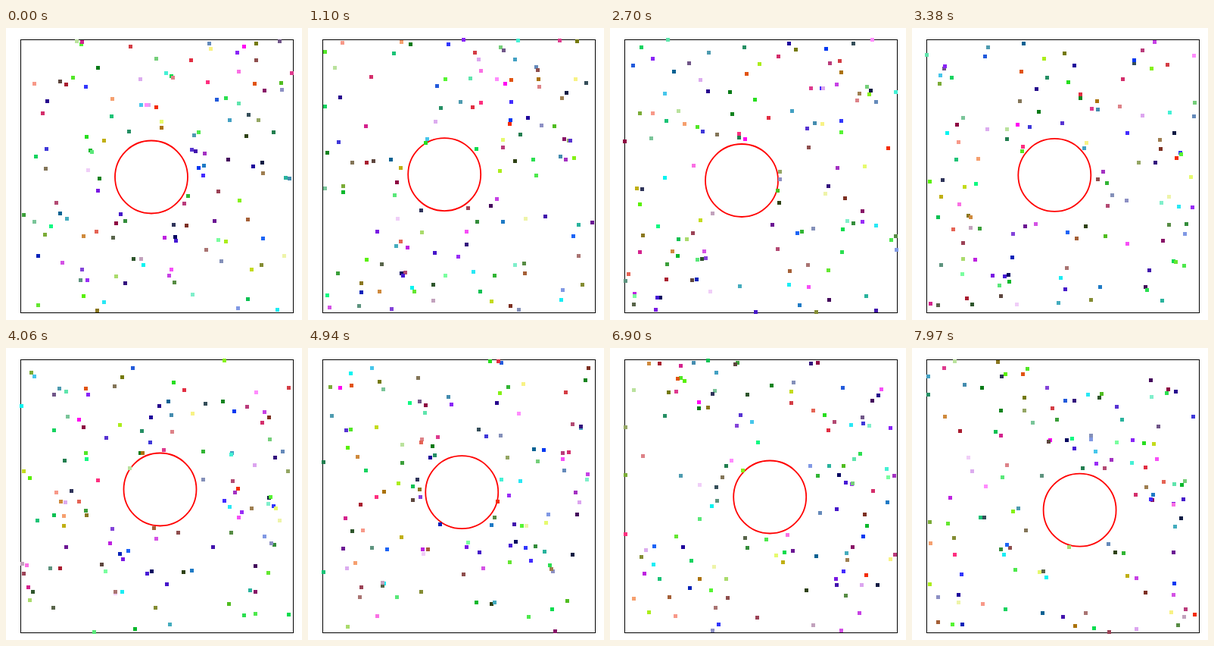
An HTML page with a canvas that plays this animation: 391x385 px, repeating every 7.99 s.

```html
<!DOCTYPE html>
<html lang="en">
<head>
<meta charset="utf-8">
<title>Brownian motion</title>
<style>
  html, body { margin: 0; width: 100%; height: 100%; overflow: hidden; background: #fff; }
  canvas { display: block; }
</style>
</head>
<body>
<canvas id="stage" width="391" height="385"></canvas>
<script>
const ctx = document.getElementById('stage').getContext('2d');

const LOOP = 7990, TICK = 30, STEP = 10;      // ms
const BOX = { left: 19, top: 15, size: 360 };
const RADIUS = 48, COUNT = 126;

// Heavy disc: time in ms, centre x, centre y
const DISC_PATH = [
  [0, 192, 196.5], [1100, 180, 193], [2700, 174, 201], [4060, 203.5, 186.5],
  [5840, 203, 194], [6900, 211.2, 196.5], [7990, 222, 214.3]
];

// Spans in which the picture stands still
const HOLDS = [[3220, 3320], [4060, 4160], [4940, 4990], [5740, 5840]];

function makeRandom(seed) {
  return () => {
    seed = (seed + 0x6D2B79F5) | 0;
    let n = Math.imul(seed ^ (seed >>> 15), 1 | seed);
    n = (n + Math.imul(n ^ (n >>> 7), 61 | n)) ^ n;
    return ((n ^ (n >>> 14)) >>> 0) / 4294967296;
  };
}

function discAt(time) {
  let i = 1;
  while (i < DISC_PATH.length - 1 && time > DISC_PATH[i][0]) i++;
  const [t0, x0, y0] = DISC_PATH[i - 1];
  const [t1, x1, y1] = DISC_PATH[i];
  const vx = (x1 - x0) / (t1 - t0), vy = (y1 - y0) / (t1 - t0);
  return { x: x0 + vx * (time - t0), y: y0 + vy * (time - t0), vx, vy };
}

function createParticles() {
  const random = makeRandom(27);
  const disc = discAt(0);
  const channel = () => Math.floor(random() * 256);
  return Array.from({ length: COUNT }, () => {
    let x, y;
    do {
      x = BOX.left + random() * BOX.size;
      y = BOX.top + random() * BOX.size;
    } while (Math.hypot(x - disc.x, y - disc.y) < RADIUS);
    const angle = random() * 2 * Math.PI;
    const speed = 0.04 + random() * 0.07;     // px per ms
    return {
      x, y,
      vx: speed * Math.cos(angle),
      vy: speed * Math.sin(angle),
      color: `rgb(${channel()}, ${channel()}, ${channel()})`
    };
  });
}

function bounceOffWall(p, axis, velocity, min) {
  const max = min + BOX.size;
  if (p[axis] < min) {
    p[axis] = 2 * min - p[axis];
    p[velocity] = Math.abs(p[velocity]);
  } else if (p[axis] > max) {
    p[axis] = 2 * max - p[axis];
    p[velocity] = -Math.abs(p[velocity]);
  }
}

function bounceOffDisc(p, disc) {
  const dx = p.x - disc.x, dy = p.y - disc.y;
  const distance = Math.hypot(dx, dy);
  if (distance >= RADIUS) return;
  const nx = dx / distance, ny = dy / distance;
  const approach = (p.vx - disc.vx) * nx + (p.vy - disc.vy) * ny;
  if (approach < 0) {
    p.vx -= 2 * approach * nx;
    p.vy -= 2 * approach * ny;
  }
  p.x = disc.x + nx * RADIUS;
  p.y = disc.y + ny * RADIUS;
}

let particles = createParticles();
let simulated = 0;

// Fixed steps from the loop start keep the state a function of time alone
function simulateTo(time) {
  if (time < simulated) {
    particles = createParticles();
    simulated = 0;
  }
  while (simulated < time) {
    simulated += STEP;
    const disc = discAt(simulated);
    for (const p of particles) {
      p.x += p.vx * STEP;
      p.y += p.vy * STEP;
      bounceOffWall(p, 'x', 'vx', BOX.left);
      bounceOffWall(p, 'y', 'vy', BOX.top);
      bounceOffDisc(p, disc);
    }
  }
}

function shownTime(time) {
  const hold = HOLDS.find(([start, end]) => time >= start && time < end);
  return hold ? hold[0] : Math.floor(time / TICK) * TICK;
}

function draw(time) {
  simulateTo(time);
  ctx.fillStyle = '#fff';
  ctx.fillRect(0, 0, 391, 385);

  ctx.strokeStyle = '#000';
  ctx.lineWidth = 1;
  ctx.strokeRect(BOX.left + 0.5, BOX.top + 0.5, BOX.size, BOX.size);

  const disc = discAt(time);
  ctx.strokeStyle = '#f00';
  ctx.lineWidth = 1.8;
  ctx.beginPath();
  ctx.arc(disc.x, disc.y, RADIUS, 0, 2 * Math.PI);
  ctx.stroke();

  for (const p of particles) {
    ctx.fillStyle = p.color;
    ctx.fillRect(Math.round(p.x) - 2, Math.round(p.y) - 2, 5, 5);
  }
}

const startTime = performance.now();
function frame() {
  draw(shownTime((performance.now() - startTime) % LOOP));
  requestAnimationFrame(frame);
}
frame();
</script>
</body>
</html>
```
